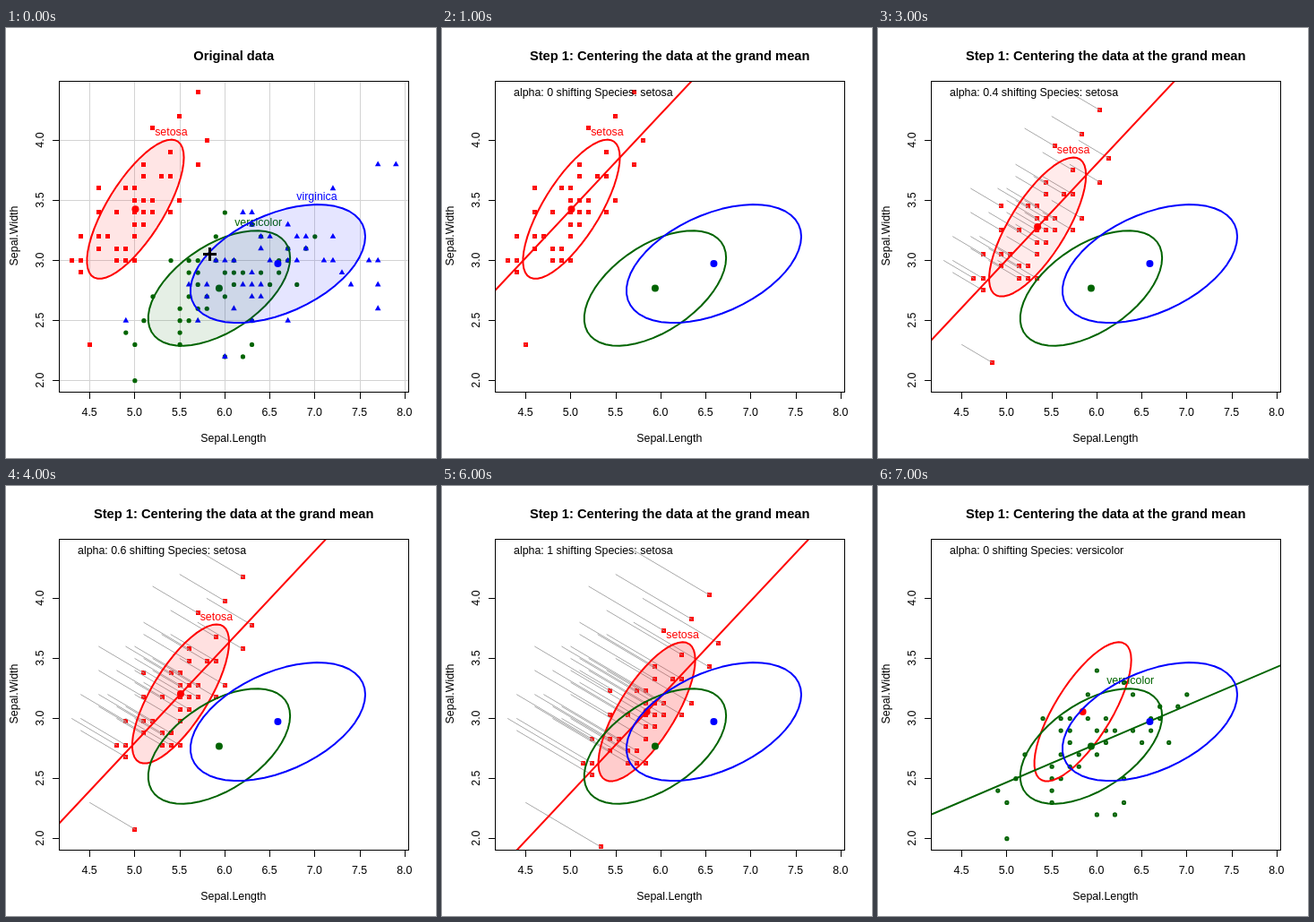
An HTML page that plays this animation: 480 px wide and 480 px high, repeating every 8000 ms.

```html
<!DOCTYPE html>
<html lang="en">
<head>
<meta charset="utf-8">
<title>Centering the data</title>
<style>
  html, body { margin: 0; width: 100%; height: 100%; overflow: hidden; background: #fff; }
  svg { display: block; width: 480px; height: 480px; }
  text { font: 12.4px "Liberation Sans", Arial, sans-serif; }
  .title { font-size: 14.7px; font-weight: bold; }
  .mid { text-anchor: middle; }
  .axis { fill: none; stroke: #000; }
  .grid { stroke: #d3d3d3; }
  .trail { stroke: #a9a9a9; stroke-linecap: round; }
  .crisp { shape-rendering: crispEdges; }
</style>
</head>
<body>
<svg viewBox="0 0 480 480">
  <defs><clipPath id="plot"><rect x="59" y="59" width="391" height="348"/></clipPath></defs>
  <g id="scene" clip-path="url(#plot)"></g>
  <g id="axes"></g>
  <text id="title" class="title mid" x="254.2" y="36"></text>
</svg>
<script>
// Points in tenths, grouped by width: { width: [lengths] }
const setosa = {
  44: [57], 42: [55], 41: [52], 40: [58], 39: [54], 38: [51, 57], 37: [51, 53, 54],
  36: [46, 49, 50], 35: [50, 51, 52, 55], 34: [46, 48, 50, 51, 52, 54], 33: [50, 51],
  32: [44, 46, 47, 50], 31: [46, 48, 49], 30: [43, 44, 48, 49, 50], 29: [44], 23: [45]
};
const versicolor = {
  34: [60], 33: [63], 32: [59, 64, 70], 31: [67, 69], 30: [54, 56, 57, 59, 61, 66, 67],
  29: [56, 57, 60, 61, 62, 64, 66], 28: [57, 61, 65, 68], 27: [52, 56, 58, 60],
  26: [55, 57, 58], 25: [51, 55, 56, 63], 24: [49, 55], 23: [50, 55, 63], 22: [60, 62], 20: [50]
};
const virginica = {
  38: [77, 79], 36: [72], 34: [62, 63], 33: [63, 67], 32: [64, 65, 68, 69, 72], 31: [64, 67, 69],
  30: [59, 60, 61, 65, 67, 68, 71, 72, 76, 77], 29: [63, 73], 28: [56, 58, 62, 63, 64, 74, 77],
  27: [58, 63, 64], 26: [61, 77], 25: [49, 57, 63, 67], 22: [60]
};

const square = (x, y) => `<rect x="${Math.round(x - 2.7)}" y="${Math.round(y - 2.7)}" width="5" height="5"/>`;
const dot = (x, y, r = 2.6) => `<circle cx="${x}" cy="${y}" r="${r}"/>`;
const triangle = (x, y) => `<path d="M${x} ${y - 3.9}l3.3 5.9h-6.6z"/>`;

const groups = [
  { name: 'setosa', color: '#f00', mark: square, data: setosa,
    mx: 5.006, my: 3.428, vx: 0.1242, vy: 0.1437, cov: 0.0992 },
  { name: 'versicolor', color: '#006400', mark: dot, data: versicolor,
    mx: 5.936, my: 2.770, vx: 0.2664, vy: 0.0985, cov: 0.0852 },
  { name: 'virginica', color: '#00f', mark: triangle, data: virginica,
    mx: 6.588, my: 2.974, vx: 0.4043, vy: 0.1040, cov: 0.0938 }
];
const grand = { x: 5.8433, y: 3.0573 };
const radius = 1.5273, sides = 51;

const px = x => 59.04 + (x - 4.156) * 100.494;
const py = y => 406.56 - (y - 1.904) * 134.07;
const snap = v => Math.floor(v) + 0.5;
const line = (x1, y1, x2, y2, attrs) => `<line x1="${x1}" y1="${y1}" x2="${x2}" y2="${y2}" ${attrs}/>`;
const range = (from, to) => Array.from({ length: (to - from) * 2 + 1 }, (_, i) => from + i / 2);
const xTicks = range(4.5, 8), yTicks = range(2, 4);

const points = g => Object.entries(g.data).flatMap(([w, ls]) => ls.map(l => [l / 10, w / 10]));
const offset = (g, a) => [a * (grand.x - g.mx), a * (grand.y - g.my)];

function marks(g, a) {
  const [dx, dy] = offset(g, a);
  return `<g fill="${g.color}">` +
    points(g).map(([x, y]) => g.mark(px(x + dx), py(y + dy))).join('') + '</g>';
}

function trails(g, a) {
  const [dx, dy] = offset(g, a);
  return points(g).map(([x, y]) =>
    line(px(x), py(y), px(x + dx), py(y + dy), 'class="trail"')).join('');
}

function ellipse(g, a, opacity, labelled) {
  const [dx, dy] = offset(g, a);
  const cx = g.mx + dx, cy = g.my + dy;
  const sx = Math.sqrt(g.vx), k = g.cov / sx, s = Math.sqrt(g.vy - k * k);
  const ring = Array.from({ length: sides }, (_, i) => {
    const t = i / sides * 2 * Math.PI;
    return [px(cx + radius * sx * Math.cos(t)), py(cy + radius * (k * Math.cos(t) + s * Math.sin(t)))];
  });
  const top = ring.reduce((p, q) => q[1] < p[1] ? q : p);
  return `<g fill="${g.color}"><polygon points="${ring.join(' ')}" fill-opacity="${opacity}"` +
    ` stroke="${g.color}" stroke-width="2" stroke-linejoin="round"/>` + dot(px(cx), py(cy), 4) +
    (labelled ? `<text class="mid" x="${top[0]}" y="${top[1] - 4.8}">${g.name}</text>` : '') + '</g>';
}

function regression(g, a) {
  const [dx, dy] = offset(g, a);
  const at = x => py(g.my + dy + (x - g.mx - dx) * g.cov / g.vx);
  return line(px(4), at(4), px(8.2), at(8.2), `stroke="${g.color}" stroke-width="2"`);
}

function overview() {
  const grid = xTicks.map(x => line(snap(px(x)), 59, snap(px(x)), 407, 'class="grid"')).join('') +
    yTicks.map(y => line(59, snap(py(y)), 450, snap(py(y)), 'class="grid"')).join('');
  return grid + groups.map(g => marks(g, 0)).join('') +
    groups.map(g => ellipse(g, 0, 0.1, true)).join('') +
    '<path class="crisp" d="M220 252.5h15M227.5 245v15" stroke="#000" stroke-width="3"/>';
}

function shifting(active, a) {
  const g = groups[active];
  const shiftOf = i => i < active ? 1 : i === active ? a : 0;
  return marks(g, a) + trails(g, a) +
    groups.map((h, i) => ellipse(h, shiftOf(i), i === active ? a * 0.2 : 0, i === active) +
      (i === active ? regression(g, a) : '')).join('') +
    `<text x="80" y="76">alpha: ${a} shifting Species: ${g.name}</text>`;
}

const centering = 'Step 1: Centering the data at the grand mean';
const steps = [
  { title: 'Original data', body: overview() },
  ...[0, 0.2, 0.4, 0.6, 0.8, 1].map(a => ({ title: centering, body: shifting(0, a) })),
  { title: centering, body: shifting(1, 0) }
];

const upright = (x, y, s) =>
  `<text class="mid" transform="translate(${x} ${y}) rotate(-90)">${s}</text>`;
const byId = id => document.getElementById(id);

byId('axes').innerHTML =
  '<rect class="axis" x="59.5" y="59.5" width="390" height="347"/>' +
  xTicks.map(x => line(snap(px(x)), 407, snap(px(x)), 414, 'class="axis"') +
    `<text class="mid" x="${px(x) - 0.5}" y="433">${x.toFixed(1)}</text>`).join('') +
  yTicks.map(y => line(52, snap(py(y)), 59, snap(py(y)), 'class="axis"') +
    upright(42, py(y) - 0.5, y.toFixed(1))).join('') +
  '<text class="mid" x="253.8" y="462">Sepal.Length</text>' + upright(13, 232, 'Sepal.Width');

const stepTime = 1000;
let shown = -1;
function draw() {
  const i = Math.floor(performance.now() / stepTime) % steps.length;
  if (i !== shown) {
    shown = i;
    byId('title').textContent = steps[i].title;
    byId('scene').innerHTML = steps[i].body;
  }
  requestAnimationFrame(draw);
}
draw();
</script>
</body>
</html>
```
